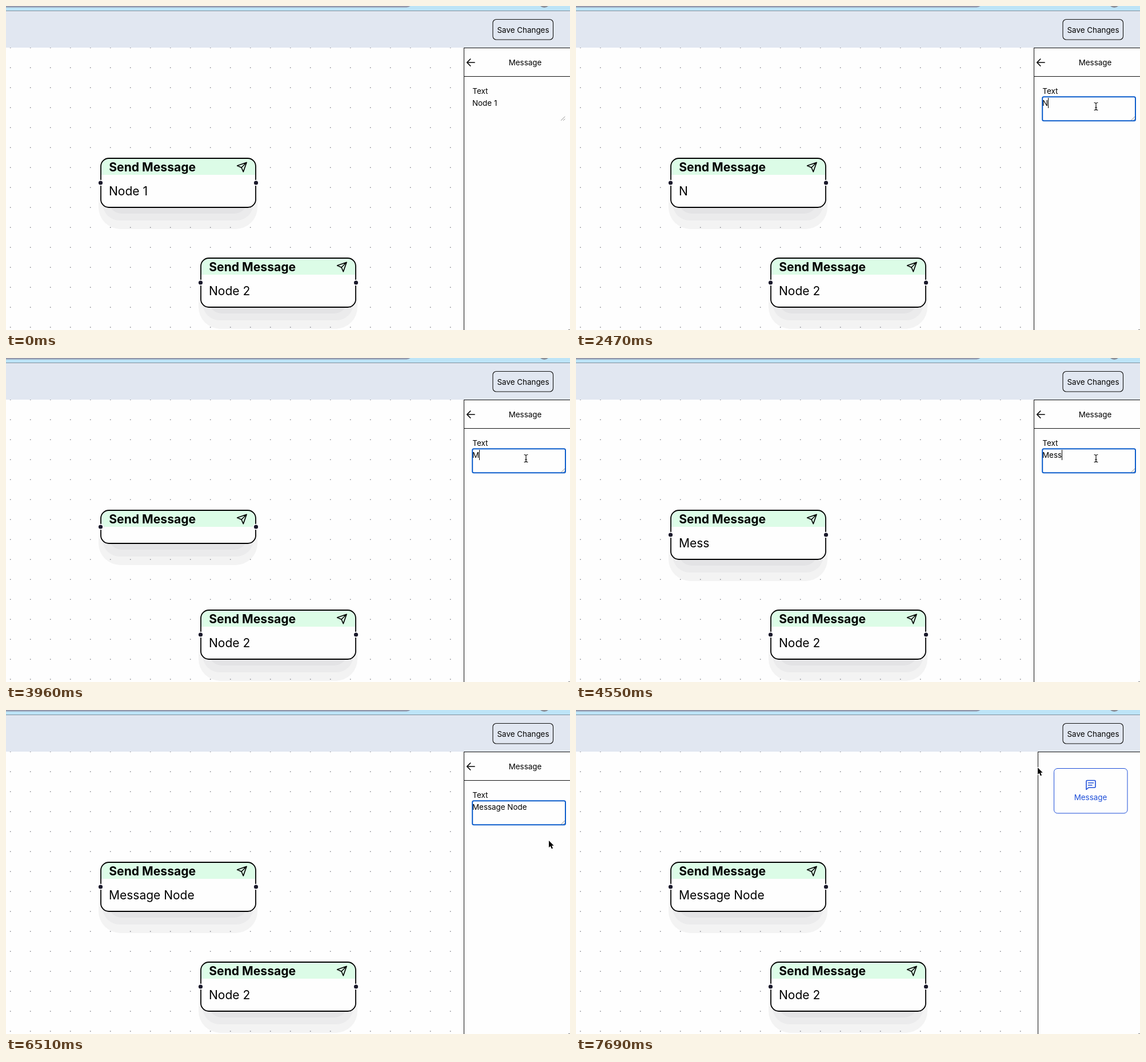
An HTML page with a canvas that plays this animation: 987x568 px, repeating every 8 s.

```html
<!DOCTYPE html>
<html lang="en">
<head>
<meta charset="utf-8">
<title>Flow editor</title>
<style>
  html, body { margin: 0; width: 100%; height: 100%; overflow: hidden; background: #fefefe; }
  canvas { display: block; }
</style>
</head>
<body>
<canvas id="stage" width="987" height="568"></canvas>
<script>
const ctx = document.getElementById('stage').getContext('2d');
const LOOP = 8000;
const FONT = 'Inter, sans-serif';
const UI = `13.4px ${FONT}`;
const BLUE = '#1d4ed8';
const PANEL_SWAP = 7570;

// [time, text in the field, delay until the node shows it]
const typing = [
  [0, 'Node 1', 0], [1450, 'Node ', 60], [1690, 'Node', 0], [1930, 'Nod', 60],
  [2230, 'No', 0], [2470, 'N', 0], [2700, '', 0],
  [3960, 'M', 60], [4140, 'Me', 60], [4310, 'Mes', 0],
  [4550, 'Mess', 0], [4670, 'Messa', 0], [4790, 'Messag', 0], [4850, 'Message', 0],
  [5030, 'Message ', 0], [5210, 'Message N', 0],
  [5390, 'Message No', 0], [5510, 'Message Nod', 0], [5570, 'Message Node', 0]
];

const caretOn = [[430, 970], [1450, 6100], [6570, 7110]];

// [time, cursor, x, y]
const pointer = [
  [0], [210, 'beam', 922, 184], [270, 'beam', 914, 179], [330, 'beam', 910, 176],
  [6100, 'beam', 914, 180], [6160, 'beam', 927, 193], [6280, 'arrow', 938, 207],
  [6510, 'arrow', 950, 229], [6570, 'arrow', 915, 190], [6630, 'arrow', 865, 150],
  [6870, 'arrow', 850, 140], [6930, 'arrow', 825, 126], [6990, 'arrow', 800, 113],
  [7050, 'arrow', 788, 107], [7110, 'arrow', 782, 104], [7210, 'arrow', 790, 102],
  [7270, 'arrow', 800, 101], [7330, 'hand', 808, 101], [7690, 'arrow', 808, 101]
];

const shapes = {
  plane: new Path2D('M22 2L15 22L11 13L2 9ZM22 2L11 13'),
  back: new Path2D('M820 99H807M812.7 93L806.7 99L812.7 105'),
  chat: new Path2D('M894.5 123.5H907.5Q909 123.5 909 125V134.5Q909 136 907.5 136H897L893 139.5V125Q893 123.5 894.5 123.5ZM896.5 127.8H905.5M896.5 131.7H903'),
  grip: new Path2D('M971.5 200.5L978 194M975.5 200.5L978 198'),
  beam: new Path2D('M-3 -6.5Q0 -6.5 0 -4.5Q0 -6.5 3 -6.5M0 -4.5V4.5M-3 6.5Q0 6.5 0 4.5Q0 6.5 3 6.5M-1.5 2H1.5'),
  arrow: new Path2D('M0 0V12L2.8 9.6L4.9 14.3L7 13.4L5 8.8H8.7Z'),
  hand: new Path2D('M-1 0Q0 -1.5 1 0V5L7 6Q9 6.5 8.5 9L7 14H0L-4 8.5Q-4 6.5 -2.5 7.5L-1 9Z')
};

const latest = (list, t) => list.filter(step => step[0] <= t).pop();

function rect(x, y, w, h, fill) {
  ctx.fillStyle = fill;
  ctx.fillRect(x, y, w, h);
}

function rounded(x, y, w, h, r, fill, stroke, width = 1) {
  ctx.beginPath();
  ctx.roundRect(x, y, w, h, r);
  if (fill) { ctx.fillStyle = fill; ctx.fill(); }
  if (stroke) { ctx.strokeStyle = stroke; ctx.lineWidth = width; ctx.stroke(); }
}

function disc(x, y, r, fill) {
  ctx.fillStyle = fill;
  ctx.beginPath();
  ctx.arc(x, y, r, 0, 7);
  ctx.fill();
}

function text(str, x, y, font = UI, align = 'left', fill = '#000') {
  ctx.font = font;
  ctx.textAlign = align;
  ctx.fillStyle = fill;
  ctx.fillText(str, x, y);
}

function line(path, width, stroke = '#000') {
  ctx.lineWidth = width;
  ctx.strokeStyle = stroke;
  ctx.stroke(path);
}

const nodeHeight = label => label.trim() ? 86 : 58;

function shadow(x, y, label) {
  const bottom = y + nodeHeight(label) + 1;
  rounded(x - 3, bottom - 44, 278, 82, 38, '#f3f3f3');
  rounded(x + 4, bottom - 44, 264, 67, 30, '#ebebec');
  rounded(x + 14, bottom - 44, 244, 55, 24, '#e3e3e5');
}

function dots() {
  for (let y = 73; y < 568; y += 35)
    for (let x = 7.7; x < 800; x += 35) disc(x, y + 0.2, 0.9, '#909096');
}

function node(x, y, label) {
  const h = nodeHeight(label);
  rounded(x + 1, y + 1, 271, h, 14, '#fefefe');
  rounded(x + 1, y + 1, 271, 29, [14, 14, 0, 0], '#dcfce7');
  rounded(x + 1, y + 1, 271, h, 14, null, '#000', 1.8);
  text('Send Message', x + 15.3, y + 23.7, `bold 21.1px ${FONT}`);
  text(label, x + 15, y + 66, `21px ${FONT}`);
  ctx.save();
  ctx.translate(x + 238, y + 6.6);
  ctx.scale(0.82, 0.82);
  line(shapes.plane, 2);
  ctx.restore();
  for (const hx of [x + 0.5, x + 272.5]) {
    disc(hx, y + 1 + h / 2, 5.2, '#fff');
    disc(hx, y + 1 + h / 2, 3.6, '#1a192b');
  }
}

function toolbar() {
  rect(0, 0, 987, 8, '#bde4f7');
  rounded(-20, -20, 731, 22.5, 10, '#9297ab');
  disc(942, -7, 10, '#8b8f98');
  rect(0, 8, 987, 1, '#7f919c');
  rect(0, 9, 987, 64, '#e1e7f1');
  rounded(852, 23.5, 105.5, 35.5, 6, null, '#111', 1.1);
  text('Save Changes', 905, 46.5, UI, 'center');
}

function panelFrame(x) {
  rect(x, 73, 987 - x, 495, '#fefefe');
  rect(x, 73, 987 - x, 1, '#111');
  rect(x, 73, 1, 495, '#111');
}

function editPanel(t, value) {
  panelFrame(801);
  rect(801, 123, 186, 1, '#111');
  line(shapes.back, 1.7);
  text('Message', 908.5, 104, UI, 'center');
  text('Text', 816.3, 154);
  text(value, 816, 175);
  if (caretOn.some(([from, to]) => t >= from && t < to))
    rect(Math.round(816 + ctx.measureText(value).width), 161, 1, 18, '#000');
  line(shapes.grip, 0.8, '#777');
  if (t >= 430) rounded(816.2, 159.2, 162.8, 42, 2.5, null, '#0b5ccb', 2);
}

function palettePanel() {
  panelFrame(808);
  rounded(836.5, 102.5, 128.5, 78.5, 6, null, BLUE);
  line(shapes.chat, 1.6, BLUE);
  text('Message', 900.5, 157.5, UI, 'center', BLUE);
}

function cursor([, kind, x, y]) {
  if (!kind) return;
  ctx.save();
  ctx.translate(x, y);
  if (kind === 'beam') {
    line(shapes.beam, 2.6, '#fff');
    line(shapes.beam, 1.1);
  } else {
    const isHand = kind === 'hand';
    line(shapes[kind], 2, isHand ? '#000' : '#fff');
    ctx.fillStyle = isHand ? '#fff' : '#000';
    ctx.fill(shapes[kind]);
  }
  ctx.restore();
}

function draw(t) {
  const value = latest(typing, t)[1];
  const label = typing.filter(([at, , delay]) => at + delay <= t).pop()[1];
  rect(0, 0, 987, 568, '#fefefe');
  shadow(165, 266, label);
  shadow(340, 441, 'Node 2');
  dots();
  node(165, 266, label);
  node(340, 441, 'Node 2');
  toolbar();
  if (t < PANEL_SWAP) editPanel(t, value);
  else palettePanel();
  rect(984, 567, 3, 1, '#888');
  cursor(latest(pointer, t));
}

ctx.lineJoin = ctx.lineCap = 'round';
const start = performance.now();
function tick() {
  draw((performance.now() - start) % LOOP);
  requestAnimationFrame(tick);
}
tick();
</script>
</body>
</html>
```
